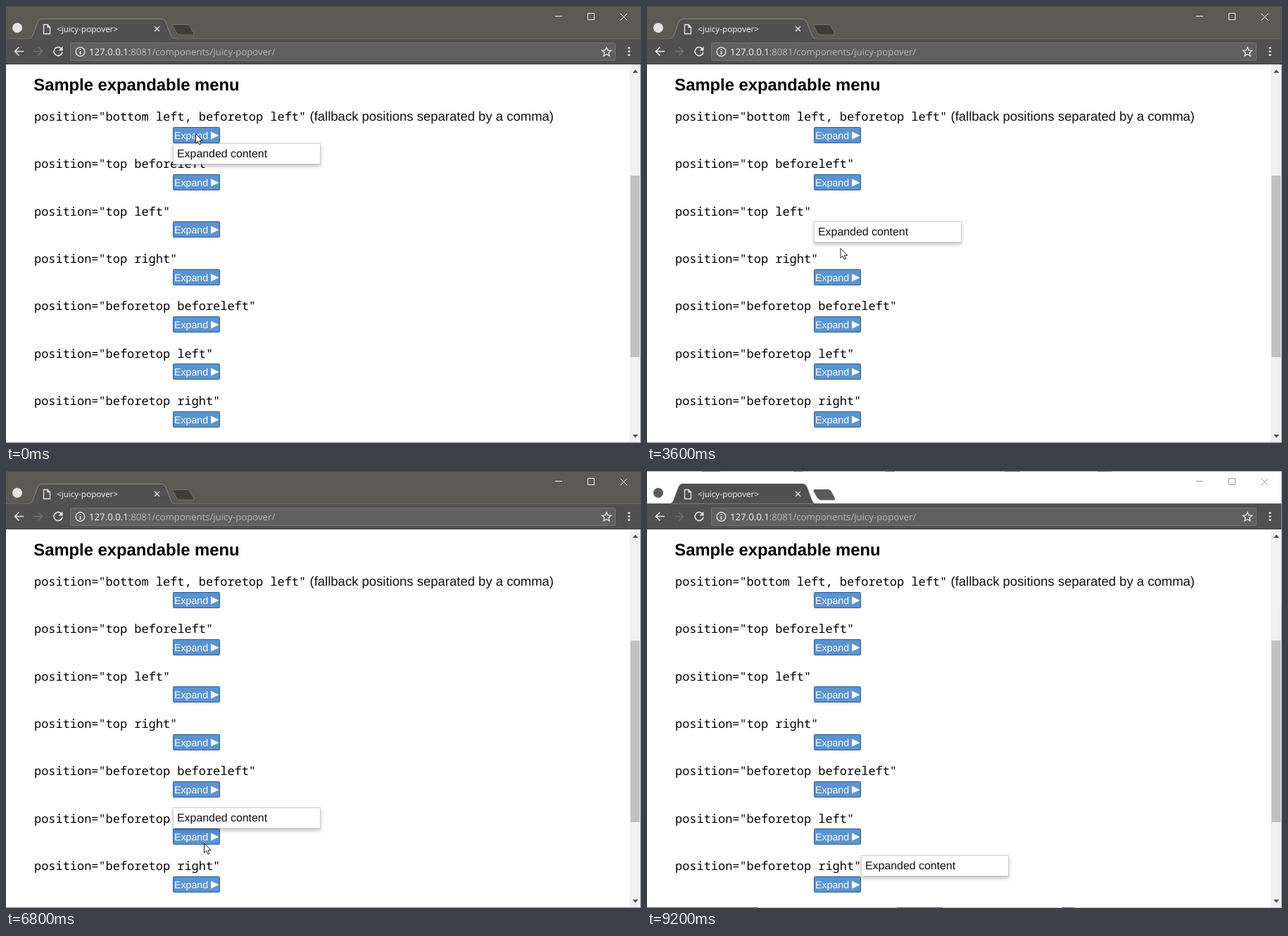
Write an HTML page that moves like this. It is 902 px wide and 621 px high and loops after 9400 ms.

```html
<!DOCTYPE html>
<html lang="en">
<head>
<meta charset="utf-8">
<title>Expandable menu</title>
<style>
  html, body { margin: 0; width: 100%; height: 100%; overflow: hidden; background: #fefefe; }
  svg { display: block; }
  .ui { font-family: "Open Sans", "Noto Sans", sans-serif; }
  .sans { font-family: "Liberation Sans", Arial, sans-serif; }
  .mono { font-family: "Noto Sans Mono", "DejaVu Sans Mono", monospace; font-size: 16.95px; }
  text { text-rendering: geometricPrecision; }
  .icon { fill: none; stroke: #e8e8e8; stroke-width: 1.6; }
  .thin { stroke-width: 1.3; }
  .dim { stroke: #727272; }
  .bar { fill: #5d5953; }
  .badge { fill: #e4e4e4; }
  .plus { fill: #403d39; stroke: #77736d; }
  .ctl { fill: none; stroke: #f4f4f4; }
  .tab { fill: #505050; stroke: #8b8882; }
  .edge { display: none; }
  .idle .bar { fill: #fefefe; }
  .idle .badge { fill: #5a5a5a; }
  .idle .plus { fill: #5a5a5a; stroke: #6a6a6a; }
  .idle .ctl { stroke: #999; }
  .idle .tab { stroke: #505050; }
  .idle .edge { display: inline; }
</style>
</head>
<body>
<svg id="stage" width="902" height="621" viewBox="0 0 902 621">
  <defs>
    <filter id="shadow" x="-10%" y="-30%" width="120%" height="180%">
      <feDropShadow dx="0" dy="3" stdDeviation="2.5" flood-color="#000" flood-opacity=".24"/>
    </filter>
  </defs>
  <rect width="902" height="621" fill="#fefefe"/>

  <g id="page">
    <text class="sans" x="39.3" y="120" font-size="23.8" font-weight="700">Sample expandable menu</text>
    <text class="sans" x="431.5" y="163" font-size="18.5" fill="#111">(fallback positions separated by a comma)</text>
  </g>

  <g id="popover">
    <rect x=".5" y=".5" width="209" height="29" fill="#fefefe" stroke="#cfcfcf" filter="url(#shadow)"/>
    <text class="sans" x="6" y="20" font-size="15.9" fill="#111">Expanded content</text>
  </g>

  <g id="scrollbar">
    <rect x="886" y="83" width="15" height="537" fill="#f1f1f1"/>
    <rect x="887" y="241" width="13" height="258" fill="#c1c1c1"/>
    <path d="M890 95h8l-4-4.5zM890 609h8l-4 4.5z" fill="#505050"/>
  </g>

  <rect class="bar" width="902" height="47"/>
  <path d="M0 .5H902" stroke="#4c4945"/>
  <circle class="badge" cx="16" cy="31" r="7"/>
  <path class="tab" d="M33 46.5C37 45 38 42 39 39L45 23Q47 18.5 50 18.5H222Q225 18.5 227 23L233 39Q235 45 238 46.5"/>
  <rect y="46.5" width="902" height="36.5" fill="#505050"/>
  <path d="M0 46.5H34M237 46.5H902" stroke="#6d6a65"/>
  <path d="M0 82.5H902" stroke="#3f3f3f"/>
  <path class="plus" d="M239 26.5H257Q260 26.5 261.5 29L266.5 39Q267.5 41 265 41H247Q244 41 242.5 38.5L237 29Q236 26.5 239 26.5Z"/>
  <path class="icon thin" d="M53.5 26.5H59L62.5 30V39.5H53.5ZM59 26.5V30H62.5"/>
  <text class="ui" x="72" y="36.5" font-size="11.7" fill="#f5f5f5">&lt;juicy-popover&gt;</text>
  <path class="icon thin" d="M211 29L218 36M218 29L211 36"/>
  <path class="ctl" d="M780 14.5H790M826.5 10.5H835.5V19.5H826.5ZM872.5 10.5L882.5 20.5M882.5 10.5L872.5 20.5"/>

  <path class="icon" d="M25 64.5H13M18.5 58.5L12.5 64.5L18.5 70.5"/>
  <path class="icon dim" d="M39 64.5H51M45.5 58.5L51.5 64.5L45.5 70.5"/>
  <path class="icon" d="M78.5 60.5A6 6 0 1 0 80 65.5"/>
  <path d="M80.5 57.5V63.5H74.5Z" fill="#e8e8e8"/>
  <rect x="91.5" y="52.5" width="774" height="25" rx="2" fill="#606060" stroke="#747474"/>
  <circle class="icon thin" cx="105.5" cy="65" r="6.3"/>
  <path class="icon" d="M105.5 64V69M105.5 61V62.6"/>
  <text class="ui" x="118" y="69.5" font-size="13.2" fill="#b8b8b8"><tspan fill="#f5f5f5">127.0.0.1</tspan>:8081/components/juicy-popover/</text>
  <path class="icon thin" d="M853 58.5L854.9 62.8L859.5 63.2L856 66.3L857 70.9L853 68.5L849 70.9L850 66.3L846.5 63.2L851.1 62.8Z"/>
  <g fill="#e8e8e8">
    <circle cx="885" cy="59.5" r="1.6"/><circle cx="885" cy="64.5" r="1.6"/><circle cx="885" cy="69.5" r="1.6"/>
  </g>

  <path d="M901.5 83V621M0 620.5H902" stroke="#8a8a8a"/>
  <g class="edge">
    <path d="M0 .5H902" stroke="#aaa"/>
    <path d="M78 .5H104M208 .5H222M338 .5H352M508 .5H530M640 .5H660" stroke="#777"/>
    <path d="M158 620.5H902" stroke="#c4c4c4"/>
    <path d="M0 620.5H158M355 620.5H420M590 620.5H606" stroke="#666"/>
    <path d="M901.5 0V190" stroke="#999"/>
  </g>
  <path id="cursor" d="M0 0V13.6L3.2 10.7L5.3 15.7L7.5 14.7L5.4 9.9H9.7Z" fill="#fff" stroke="#222"/>
</svg>
<script>
const LOOP = 9400, TICK = 200, PITCH = 67.35;
const $ = id => document.getElementById(id);

// label, popover x, popover offset from the button top
const rows = [
  ["bottom left, beforetop left", 237, 23],
  ["top beforeleft", 28, 0],
  ["top left", 237, 0],
  ["top right", 304, 0],
  ["beforetop beforeleft", 28, -30],
  ["beforetop left", 237, -30],
  ["beforetop right", 304, -30]
];

// time, open row (-1 = closed)
const opens = [
  [0, 0], [200, -1], [1400, 1], [2200, -1], [3000, 2], [3800, -1], [4400, 3],
  [4600, -1], [5600, 4], [5800, -1], [6800, 5], [7000, -1], [8000, 6]
];

// time, cursor x, cursor y
const path = [
  [0, 269.5, 181.5], [200, 269.5, 181.5], [1200, 272.5, 253.5], [2200, 272.5, 253.5],
  [2800, 274, 318], [3200, 274, 318], [3600, 275, 344.5], [4200, 278, 388],
  [4600, 278, 388], [5400, 281.5, 453.5], [5800, 281.5, 453.5], [6600, 281.5, 529],
  [7000, 281.5, 529], [7800, 281.5, 592], [8400, 281.5, 592], [8800, 282, 640], [LOOP, 282, 640]
];

const buttonTop = i => Math.floor(172 + PITCH * i);

function add(parent, tag, attrs, text = "") {
  const el = document.createElementNS("http://www.w3.org/2000/svg", tag);
  for (const k in attrs) el.setAttribute(k, attrs[k]);
  el.textContent = text;
  parent.append(el);
  return el;
}

function place(el, x, y) {
  el.setAttribute("transform", `translate(${x} ${y})`);
}

const buttons = rows.map(([label], i) => {
  add($("page"), "text", { class: "mono", x: 40, y: Math.round(163 + PITCH * i) }, `position="${label}"`);
  const g = add($("page"), "g", {});
  place(g, 237, buttonTop(i));
  add(g, "rect", { x: .5, y: .5, width: 66, height: 22, rx: 1, fill: "#5b93cf", stroke: "#2f5c93" });
  add(g, "text", { class: "sans", x: 2, y: 17, "font-size": 14.2, fill: "#fff" }, "Expand");
  add(g, "path", { d: "M54 6.5L65.5 12L54 17.5Z", fill: "#fff" });
  return g;
});

function cursorAt(t) {
  const i = path.findIndex(p => p[0] > t);
  const [t0, x0, y0] = path[i - 1], [t1, x1, y1] = path[i];
  const u = (t - t0) / (t1 - t0), k = u * u * (3 - 2 * u);
  return [x0 + (x1 - x0) * k, y0 + (y1 - y0) * k];
}

function draw(time) {
  const t = Math.floor(time % LOOP / TICK) * TICK;
  const row = opens.filter(o => o[0] <= t).pop()[1];
  $("popover").style.display = row < 0 ? "none" : "";
  if (row >= 0) place($("popover"), rows[row][1], buttonTop(row) + rows[row][2]);
  buttons[2].style.display = row === 2 ? "none" : "";
  place($("cursor"), ...cursorAt(t));
  $("stage").setAttribute("class", t >= 9000 ? "idle" : "");
}

const start = performance.now();
function loop() {
  draw(performance.now() - start);
  requestAnimationFrame(loop);
}
loop();
</script>
</body>
</html>
```
